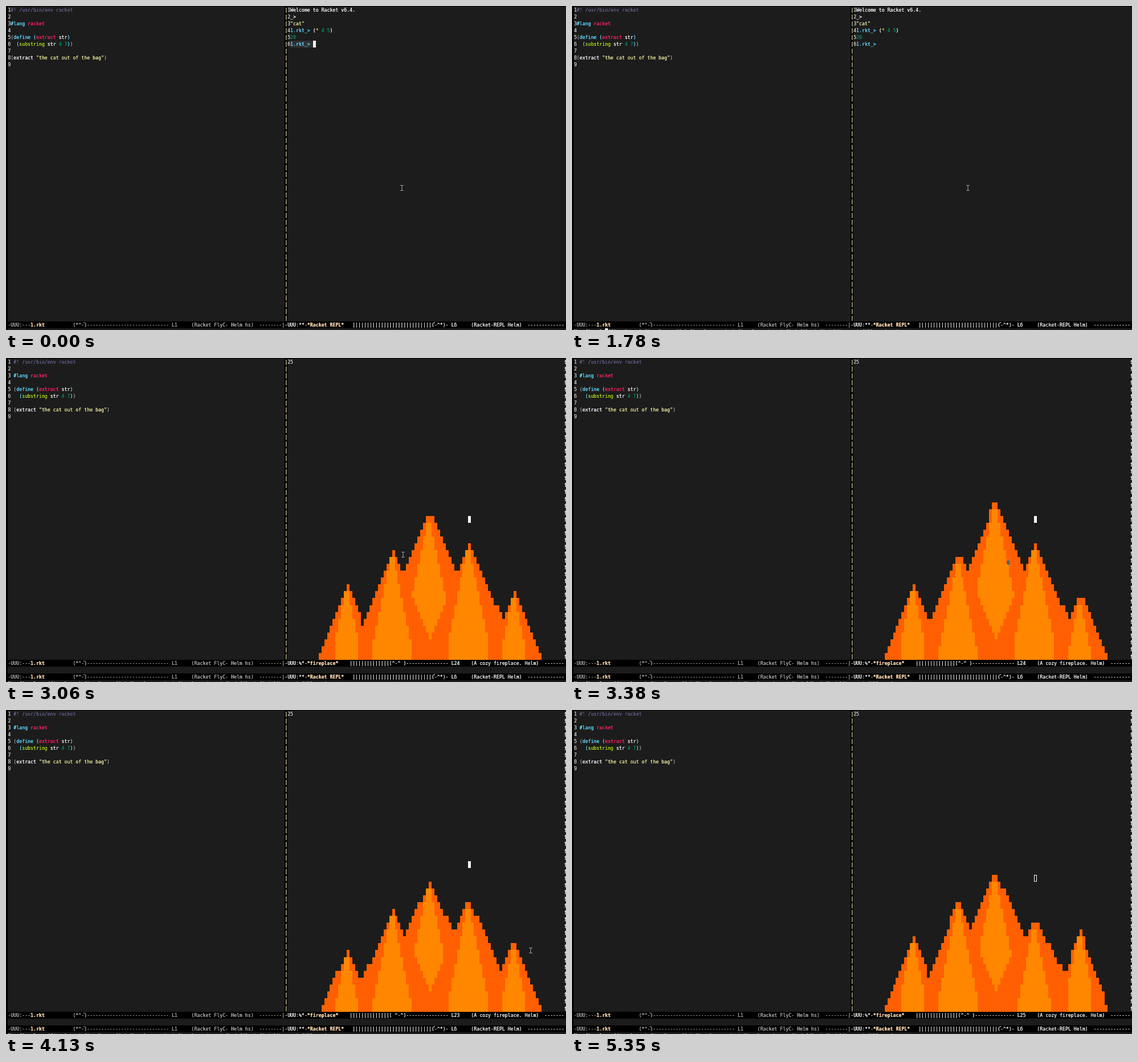
Animation of 983x570 px, one loop 5450 ms. Source, as an HTML page with a canvas:

```html
<!DOCTYPE html>
<html lang="en">
<head>
<meta charset="utf-8">
<title>Terminal fireplace</title>
<style>
html, body { margin: 0; width: 100%; height: 100%; overflow: hidden; background: #000; }
canvas { display: block; }
</style>
</head>
<body>
<canvas id="stage" width="983" height="570"></canvas>
<script>
const ctx = document.getElementById('stage').getContext('2d');
const LOOP = 5450, PROMPT = 750, OPEN = 2220, BURN = 3060;
const CW = 4.957, RH = 12.045, X0 = 3.4, Y0 = 0.9;
const FONT = '8.234px "DejaVu Sans Mono", monospace';
const C = {
  bg: '#1c1c1c', num: '#c6c6c6', white: '#f2f2f2', dim: '#b2b2b2', comment: '#5f5f87',
  cyan: '#5fd7ff', red: '#ff1f60', green: '#a8d818', teal: '#00875f', text: '#e6e69a',
  paren: '#a0a0a0', name: '#ffd7af', bar: '#bdb08c', outer: '#ff5f00', inner: '#ff8700'
};

const colX = c => Math.round(X0 + CW * c);
const rowY = r => Math.round(Y0 + RH * r);
const mix = (a, b, k) => a + (b - a) * k;
const noise = seed => {
  const v = Math.sin(seed * 12.9898) * 43758.5453;
  return v - Math.floor(v);
};

function box(c, r, w, color, h = 1) {
  ctx.fillStyle = color;
  ctx.fillRect(colX(c), rowY(r), colX(c + w) - colX(c), rowY(r + h) - rowY(r));
}

// Writes text on the character grid and returns the next free column.
function put(c, r, text, color, bold) {
  ctx.font = (bold ? 'bold ' : '') + FONT;
  ctx.fillStyle = color;
  for (const ch of text) {
    const x = X0 + CW * c++, y = Y0 + RH * r + 8.7;
    // Two passes give the strong strokes of a terminal.
    for (let pass = 0; pass < 2 && ch !== ' '; pass++) ctx.fillText(ch, x, y);
  }
  return c;
}

function line(c, r, ...parts) {
  for (const [text, color] of parts) c = put(c, r, text, C[color]);
}

const code = [
  [['#! /usr/bin/env racket', 'comment']],
  [],
  [['#lang', 'cyan'], [' racket', 'red']],
  [],
  [['(', 'paren'], ['define ', 'cyan'], ['(', 'cyan'], ['extract', 'red'], [' str', 'white'], [')', 'cyan']],
  [['  (', 'cyan'], ['substring', 'green'], [' str', 'white'], [' 4 7', 'teal'], [')', 'cyan'], [')', 'paren']],
  [],
  [['(', 'paren'], ['extract ', 'white'], ['"the cat out of the bag"', 'text'], [')', 'paren']],
  []
];

const repl = [
  [['Welcome to Racket v6.4.', 'white']],
  [['_>', 'white']],
  [['"cat"', 'text']],
  [['1.rkt_>', 'cyan'], [' (', 'white'], ['*', 'green'], [' 4 5', 'teal'], [')', 'white']],
  [['20', 'teal']],
  [['1.rkt_>', 'cyan']]
];

function listing(c, gap, rows) {
  rows.forEach((parts, r) => {
    put(c, r, String(r + 1), C.num);
    line(c + 1 + gap, r, ...parts);
  });
}

function modeLeft(r) {
  box(0, r, 198, '#000');
  put(0, r, '-UUU:---', C.dim);
  put(8, r, '1.rkt', C.name, true);
  put(23, r, '(*^-)' + '-'.repeat(29) + ' L1', C.dim);
  put(26.5, r, 'ˇ', C.dim);
  put(65, r, '(Racket FlyC- Helm hs)', C.dim);
  put(89, r, '-'.repeat(8) + '|', C.dim);
}

function modeRepl(r) {
  put(98, r, '-UUU:**-', C.white);
  put(106, r, '*Racket REPL*', C.name, true);
  put(122, r, '|'.repeat(28) + '(-^*)- L6', C.white);
  put(150.5, r, 'ˇ', C.white);
  put(164, r, '(Racket-REPL Helm)', C.white);
  put(184, r, '-'.repeat(13), C.white);
}

function modeFire(r, at) {
  const bars = at > 24 ? 15 : 14;
  const face = at < 24 ? '( ^-^)' : '(^-^ )';
  put(98, r, '-UUU:%*-', C.white);
  put(106, r, '*fireplace*', C.name, true);
  put(121, r, '|'.repeat(bars) + face + '-'.repeat(29 - bars) + ' L' + at, C.white);
  put(164, r, '(A cozy fireplace. Helm)', C.white);
  put(190, r, '-'.repeat(7), C.white);
}

// Flame: centre column, outer half width at the base, widest inner half width.
const flames = [[120, 10, 4], [136, 15.5, 7], [149, 22, 6.5], [163, 18, 7], [179, 10, 4]];
const lowTips = [36, 33, 29, 32, 36];

// Key poses; the fire flickers between them every gap ms.
const poses = [
  { t: BURN, gap: 155, at: 24, tips: [33, 28, 22.1, 27, 34], mouse: [697, 346] },
  { t: 3680, gap: 150, at: 23, tips: [32.4, 26.4, 19, 26.4, 35.1], mouse: [834, 374] },
  { t: 4130, gap: 157, at: 23, tips: [35, 29, 25, 27.4, 33.4], mouse: [921, 423] },
  { t: 4600, gap: 180, at: 24, tips: [31, 29, 23, 26.4, 32.4], mouse: [985, 459] },
  { t: 5350, gap: 180, at: 25, tips: [33, 27.4, 23.4, 30.4, 32], mouse: [985, 459] }
];

function poseAt(t) {
  const i = poses.findLastIndex(p => p.t <= t);
  const a = poses[i], b = poses[i + 1] || a;
  const n = Math.min(3, Math.floor((t - a.t) / a.gap));
  if (!n) return a;
  const k = n * a.gap / (b.t - a.t);
  const seed = i * 40 + n * 7;
  return {
    at: noise(seed) < 0.4 ? 23 : 24,
    tips: a.tips.map((v, j) => mix(v, b.tips[j], k) + 2 * noise(seed + j + 1) - 1),
    mouse: a.mouse.map((v, j) => Math.round(mix(v, b.mouse[j], k)))
  };
}

function span(mid, r, half, trim, color) {
  const left = Math.round(half);
  box(mid - left, r, left + Math.max(0, Math.round(half - trim)) + 1, color);
}

function drawFire(tips) {
  flames.forEach(([mid, base], i) => {
    const tip = tips[i], slope = base / (43.5 - tip);
    for (let r = Math.ceil(tip); r < 44; r++) span(mid, r, slope * (r - tip), 0.3, C.outer);
  });
  flames.forEach(([mid, , cap], i) => {
    const top = Math.ceil(tips[i]);
    for (let r = top + 1; r < 44; r++) {
      let half = Math.min(0.5 * (r - top), cap);
      if (i === 2) half = Math.min(half, 40.4 - r);
      if (half >= 0) span(mid, r, half, 0.8, C.inner);
    }
  });
}

function drawMouse([x, y]) {
  if (x > 950) return;
  ctx.fillStyle = '#000';
  ctx.fillRect(x - 1.5, y - 5, 3, 10);
  ctx.fillStyle = '#dcdcdc';
  ctx.fillRect(x - 0.5, y - 4, 1, 8);
  for (const dy of [-5, 4]) {
    ctx.fillRect(x - 2.5, y + dy, 2, 1);
    ctx.fillRect(x + 0.5, y + dy, 2, 1);
  }
}

const choices = ' {fireplace | fireplace-off | fireplace-mode | fireplace-draw | find-file | find-library | fill-region' +
  ' | fill-paragraph | find-function | find-variable | finder-by-keyword | first-error | fit-window}';

function minibuffer(t) {
  if (t < PROMPT) return;
  const early = t < 1490;
  const n = early ? Math.min(2, Math.floor((t - PROMPT) / 220))
    : Math.min(9, 5 + Math.floor((t - 1490) / 145));
  const c = put(0, 47, 'M-x ' + 'fireplace'.slice(0, n), C.white);
  put(c, 47, choices.slice(0, (early ? 192 : 116) - c), C.dim);
  if (t < OPEN) box(c, 47, 1, C.white);
}

function replPane(t) {
  if (t < PROMPT) {
    box(100, 5, 8, '#303030');
    box(108, 5, 1, C.white);
  }
  listing(99, 0, repl);
}

// The new buffer first opens scrolled to its lower half.
function scrolledPane() {
  const first = 25, last = 45, rows = last - first;
  for (let r = 0; r <= rows; r++) put(99, r, String(first + r), C.num);
  for (let r = 0; r < rows; r++) put(197, r, '$', C.white);
  ctx.save();
  ctx.translate(0, Y0 - rowY(first - 1));
  drawFire(lowTips);
  ctx.restore();
  box(101, rows, 1, C.white);
  modeFire(44, last);
}

function firePane({ at, tips }) {
  put(99, 0, '25', C.num);
  for (let r = 0; r < 44; r++) put(197, r, '$', C.white);
  drawFire(tips);
  if (at === 25) {
    ctx.strokeStyle = C.white;
    ctx.strokeRect(colX(163) + 0.5, rowY(at - 1) + 0.5, 4, 11);
  } else box(163, at - 1, 1, C.white);
  modeFire(44, at);
}

function draw(t) {
  const open = t >= OPEN;
  const rows = open ? 44 : 46;
  ctx.fillStyle = '#000';
  ctx.fillRect(0, 0, 983, 570);
  box(0, 0, 198, C.bg, 48);
  box(98, 0, 1, '#000', rows);
  ctx.fillStyle = C.bar;
  for (let r = 0; r < rows; r++) ctx.fillRect(491, rowY(r) + 2, 1.5, 9);
  listing(0, open ? 1 : 0, code);
  if (open) modeLeft(44);

  let mouse = t < 2670 ? [695, 320] : poses[0].mouse;
  if (t >= BURN) {
    const pose = poseAt(t);
    firePane(pose);
    mouse = pose.mouse;
  } else if (open) scrolledPane();
  else replPane(t);

  modeLeft(46);
  modeRepl(46);
  minibuffer(t);
  drawMouse(mouse);
}

const start = performance.now();
function tick() {
  draw((performance.now() - start) % LOOP);
  requestAnimationFrame(tick);
}
tick();
</script>
</body>
</html>
```
